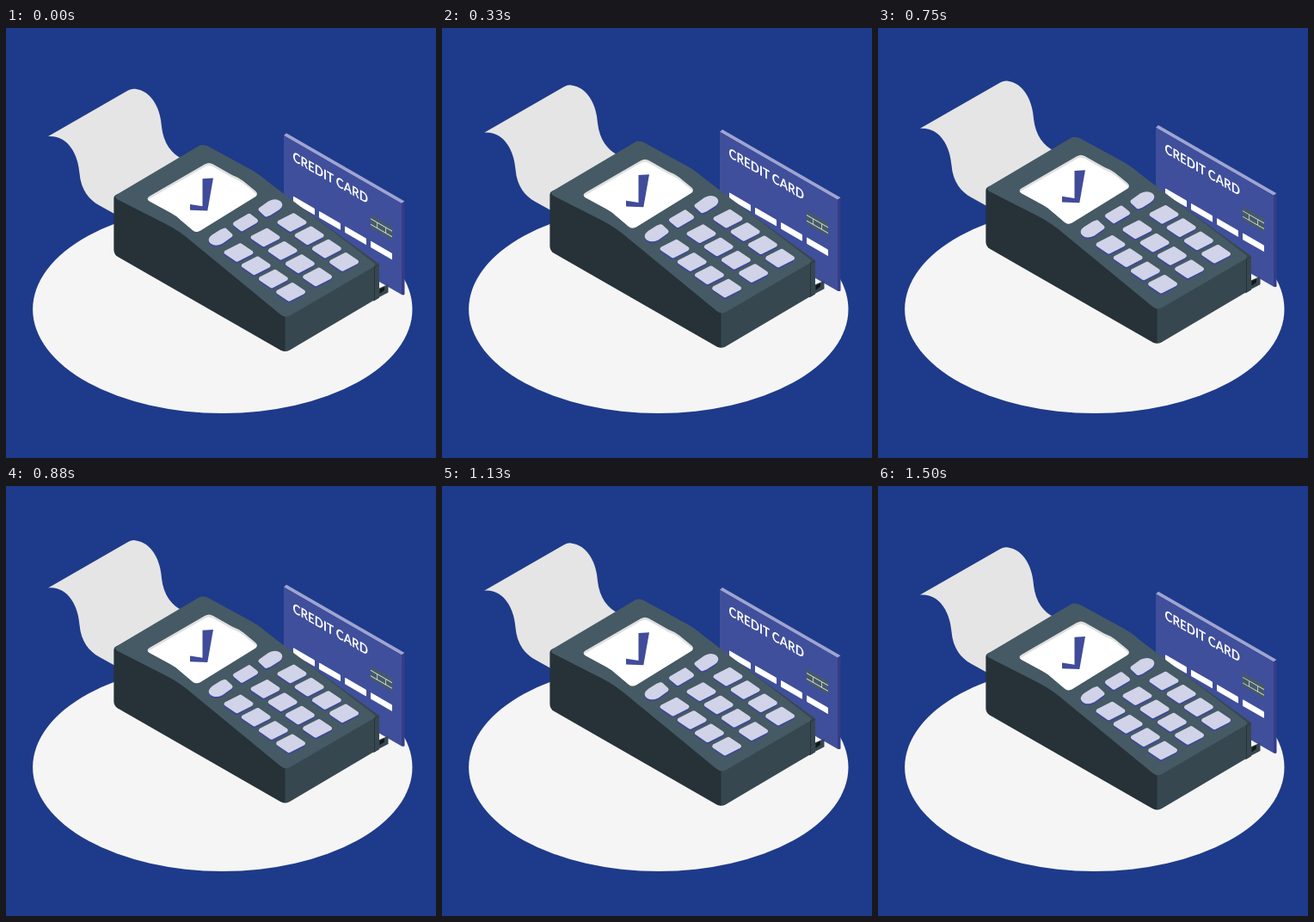
Animation, 500 px wide and 500 px high, one loop 1.54 s. Source, as an HTML page:

```html
<!DOCTYPE html>
<html lang="en">
<head>
<meta charset="utf-8">
<title>Card terminal</title>
<style>
  html, body { margin: 0; width: 100%; height: 100%; overflow: hidden; background: #1e3a8a; }
  svg { display: block; width: 100%; height: 100%; }
  text { font: 700 15.5px Lato, sans-serif; fill: #fff; }
  #keys { stroke-width: 5; stroke-linejoin: round; }
</style>
</head>
<body>
<svg viewBox="0 0 500 500">
  <defs>
    <path id="screen" d="M167 195.500L231 158.500Q236 155.500 241 158.500L263 171Q270 173.500 276 178L290 189.500Q294 193 290 196L226 235.500Q221 238.500 217 235L204 224Q198 218 191 214.500L167 201.500Q162 198.500 167 195.500Z"/>
    <path id="pill" d="M250.500 236.500L254.500 235L261 241L250.500 248.500Q244 251.500 240 249Q236 246 241 242.500Z"/>
    <path id="bar" d="M-12 1.700L4.300 -7.800L12 -1.700L-4.300 7.800Z"/>
    <path id="key" d="M-14.300 0L2 -8.300L14.300 0L-2 8.300Z"/>
    <clipPath id="glass"><use href="#screen"/></clipPath>
  </defs>

  <ellipse cx="251.800" cy="327" rx="220.700" ry="121" fill="#f5f5f5"/>

  <g id="terminal">
    <path fill="#e5e5e5" d="M49 126L142 72.600Q146 70.300 150 70.700C170 73 180 95 181 115C183 134 193 147 205 152L190 210L126 216L108 206C97 200 87 188 85.500 169C84 147 72 124 49 126Z"/>

    <!-- credit card -->
    <path fill="#9fa4d1" d="M323 125L326 122.300L463.500 201.500L460 204Z"/>
    <path fill="#353d85" d="M460 204L463.500 201.500V309.500Q463 311 460 310Z"/>
    <path fill="#404f9b" d="M323 125L460 204V310L323 231Z"/>
    <g transform="matrix(.866 .5 0 1 323 125)">
      <text x="12.200" y="23.200">CREDIT CARD</text>
      <g id="stripes" fill="#fff"></g>
      <rect x="116.600" y="33.700" width="28.900" height="15" rx="1" fill="#455a64"/>
      <path fill="none" stroke="#dfe5e8" stroke-width=".9" d="M116.600 38.500h28.900M116.600 45h28.900M125.500 38.500v6.500M137 38.500v6.500"/>
    </g>

    <!-- card slot -->
    <path fill="#37474f" d="M433 303L444.500 298V307.500L433 313.500Z"/>
    <path fill="#11181c" d="M434.500 303.500L440 301V305L434.500 309Z"/>
    <path fill="#37474f" d="M321 192.500L434 274.500V313.500L427 317.500V277Z"/>
    <path fill="#263238" d="M427.500 278L434 275V313.500L427.500 317.500Z"/>
    <path fill="#37474f" d="M429 278L434 275.500V313.500L429 316.500Z"/>

    <!-- body -->
    <path fill="#263238" d="M125.400 198Q125.400 194.500 130 193L200 215L325 333V376Q322 376 319 374.500L130 266Q125.400 263 125.400 258Z"/>
    <path fill="#37474f" d="M324.500 335L428 275V316.500L330 374.500Q327 376 324.500 376Z"/>
    <path fill="#455a64" d="M129 193.500L224 137.300Q229 134.500 235 137.500L279 161.500Q293 168.500 303 177.500L427 272.500Q431 275.500 427 278L331 334Q325 338 319 333L218 250Q202 236 186 228L129 199Q125 196 129 193.500Z"/>

    <use href="#screen" fill="#e0e0e0"/>
    <g clip-path="url(#glass)"><use href="#screen" y="3" fill="#fff"/></g>
    <path fill="#404b9a" d="M228.500 175.200L241 174.500L234.300 212.500L214 211.800V205L228.500 207.200Z"/>
    <g id="keys"></g>
  </g>
</svg>
<script>
  const byId = id => document.getElementById(id);
  const range = n => [...Array(n).keys()];

  byId('stripes').innerHTML = range(4).map(i =>
    `<rect x="${12.7 + 34.64 * i}" y="64.2" width="28.9" height="7.6" rx="1"/>`).join('');

  // Each key is a pale cap over its own blue shadow.
  const key = (shape, place) => [['#3c479a', 1.9], ['#d1d3e8', 0]].map(([color, drop]) =>
    `<use href="#${shape}" fill="${color}" stroke="${color}" transform="translate(0 ${drop}) ${place}"/>`).join('');

  byId('keys').innerHTML =
    key('pill', '') +
    key('bar', 'translate(278.5 226)') +
    key('pill', 'rotate(180 278.5 226)') +
    range(12).map(n => {
      const row = n >> 2, col = n & 3;
      return key('key', `translate(${270.5 + 20.2 * col + 31 * row} ${261 + 15.3 * col - 17.5 * row})`);
    }).join('');

  // Steady rise and fall, stepped at 24 poses per second.
  const LOOP = 1540, HALF = 18.5, RISE = 10;
  const terminal = byId('terminal');

  function draw() {
    const step = Math.floor((performance.now() % LOOP + 4) * 0.024) % 37;
    const lift = RISE * (1 - Math.abs(step - 17.5) / HALF);
    terminal.setAttribute('transform', `translate(0 ${0.54 - lift})`);
    requestAnimationFrame(draw);
  }
  draw();
</script>
</body>
</html>
```
